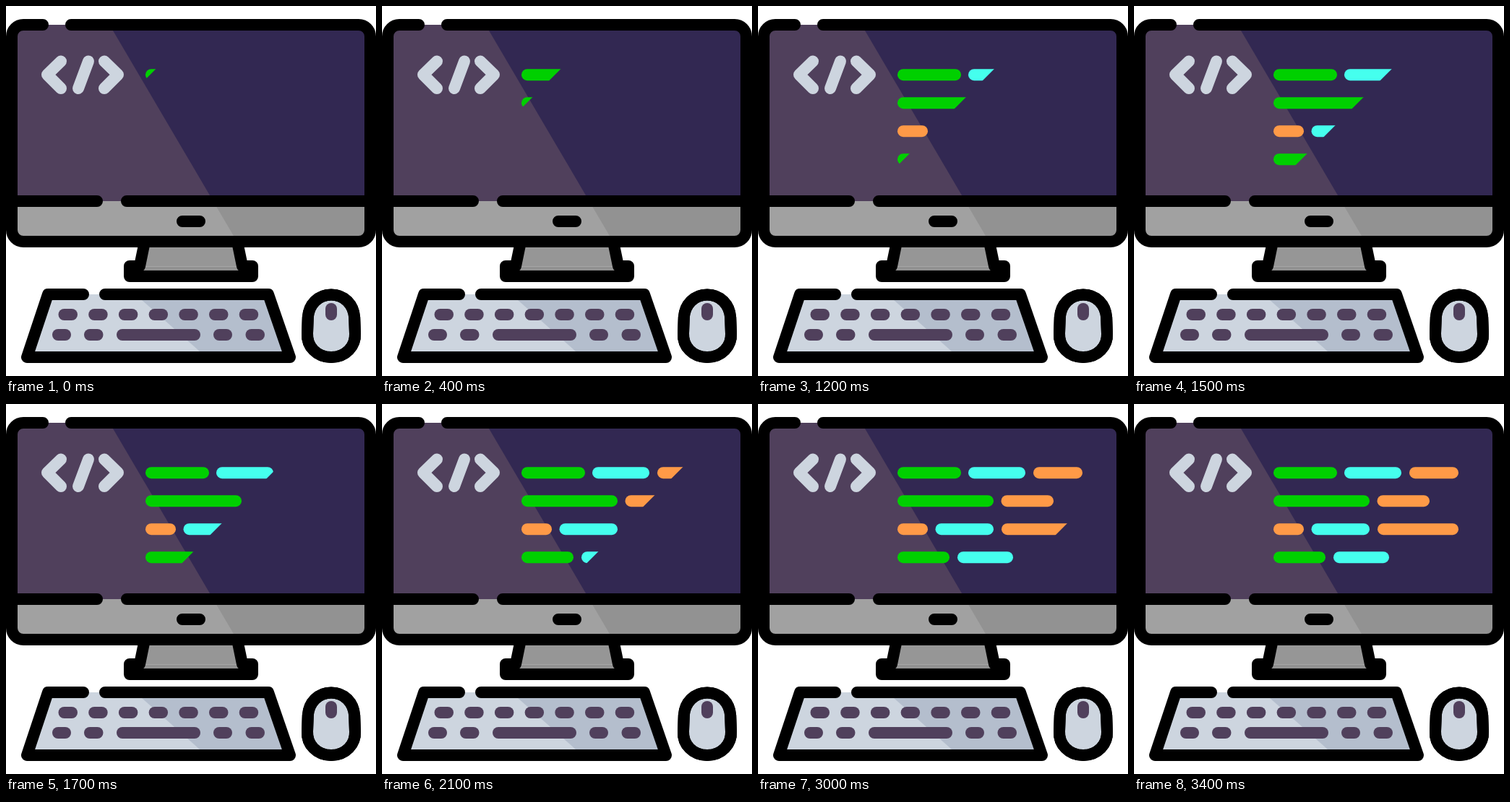
An HTML page that plays this animation: 512 px wide and 512 px high, repeating every 3500 ms.

```html
<!DOCTYPE html>
<html lang="en">
<head>
<meta charset="utf-8">
<title>Coding computer</title>
<style>
  html, body { margin: 0; width: 100%; height: 100%; overflow: hidden; background: #fff; }
  svg { display: block; width: 100%; height: 100%; }
  .line { fill: none; stroke-width: 16; stroke-linecap: round; stroke-linejoin: round; }
  .ink { stroke: #000; }
  .pale { stroke: #cdd5df; }
  .key { stroke: #50405c; }
</style>
</head>
<body>
<svg viewBox="0 0 512 512">
  <defs>
    <clipPath id="wipe"><polygon id="edge" points="0,0 294,0 0,294"/></clipPath>
    <clipPath id="body"><rect x="8" y="26" width="496" height="300" rx="16"/></clipPath>
  </defs>

  <!-- stand -->
  <path fill="#969696" d="M192 326H320L327 360H185Z"/>
  <path fill="#919191" d="M171 360H341V374H171Z"/>
  <path stroke="#a6a6a6" d="M190 360.5H322"/>
  <path class="line ink" d="M192 326L185 360H171V374H341V360H327L320 326"/>

  <!-- monitor -->
  <g clip-path="url(#body)">
    <path fill="#322852" d="M0 20H512V270H0Z"/>
    <path fill="#50405c" d="M0 26H143.3L286.7 270H0Z"/>
    <path fill="#929292" d="M0 270H512V330H0Z"/>
    <path fill="#a1a1a1" d="M0 270H286.7L319.6 326H0Z"/>
  </g>
  <path class="line ink" d="M51 26H24A16 16 0 0 0 8 42V310A16 16 0 0 0 24 326H488A16 16 0 0 0 504 310V42A16 16 0 0 0 488 26H90"/>
  <path class="line ink" d="M8 270H126M167 270H504M244 298H268"/>
  <path class="line pale" d="M76 76.500L57 95L76 114M114 76.500L100 114M136 76.500L155 95L136 114"/>
  <g id="code" clip-path="url(#wipe)"></g>

  <!-- keyboard -->
  <path fill="#b4becd" d="M58 399H363L393 486H29Z"/>
  <path fill="#cdd5df" d="M58 399H179L277 486H29Z"/>
  <g id="keys"></g>
  <path class="line ink" d="M107 399H58L29 486H393L363 399H137"/>

  <!-- mouse -->
  <path id="shell" fill="#cdd5df" d="M450 399.500C432 399.500 419 413 417.800 431L417 453C416 471 430 486 450 486S484 471 483 453L482.200 431C481 413 468 399.500 450 399.500Z"/>
  <path fill="#b4becd" d="M475 424C476 452 457 473 429 473C434 482 441 486 450 486C470 486 484 471 483 453L482 429Z"/>
  <use href="#shell" class="line ink" style="fill:none" fill="none"/>
  <path class="line ink" d="M450 399.500C432 399.500 419 413 417.800 431L417 453C416 471 430 486 450 486S484 471 483 453L482.200 431C481 413 468 399.500 450 399.500Z"/>
  <path class="line key" d="M450 419V427"/>
</svg>
<script>
const GREEN = "#00d000", CYAN = "#45ffee", ORANGE = "#ff9a47";
const LOOP = 3500, STEP = 100;
const byId = id => document.getElementById(id);

// Pill from left to right edge, 16 high, centred on y
function pill(parent, y, left, right, color) {
  const path = document.createElementNS("http://www.w3.org/2000/svg", "path");
  path.setAttribute("class", "line");
  path.setAttribute("stroke", color);
  path.setAttribute("d", `M${left + 8} ${y}H${right - 8}`);
  parent.append(path);
}

const rows = [
  [[193, 281, GREEN], [291, 370, CYAN], [381, 449, ORANGE]],
  [[193, 326, GREEN], [336.5, 409, ORANGE]],
  [[193, 235, ORANGE], [245.5, 326, CYAN], [337, 449, ORANGE]],
  [[193, 265, GREEN], [276, 353, CYAN]]
];
rows.forEach((row, i) => row.forEach(bar => pill(byId("code"), 95.2 + i * 39, ...bar)));

const keys = byId("keys"), KEY = "#50405c";
for (let i = 0; i < 7; i++) pill(keys, 427, 72.5 + i * 41.7, 99 + i * 41.7, KEY);
for (const [a, b] of [[64, 90], [108, 134.5], [153, 269], [287, 313], [331.5, 358]]) pill(keys, 455, a, b, KEY);

// A diagonal edge uncovers the code lines in hard steps
function draw(now) {
  const step = Math.floor((now % LOOP) / STEP);
  const reach = 294.6 + step * 9.95;
  byId("edge").setAttribute("points", `0,0 ${reach},0 0,${reach}`);
}

const start = performance.now();
function tick() {
  draw(performance.now() - start);
  requestAnimationFrame(tick);
}
tick();
</script>
</body>
</html>
```
